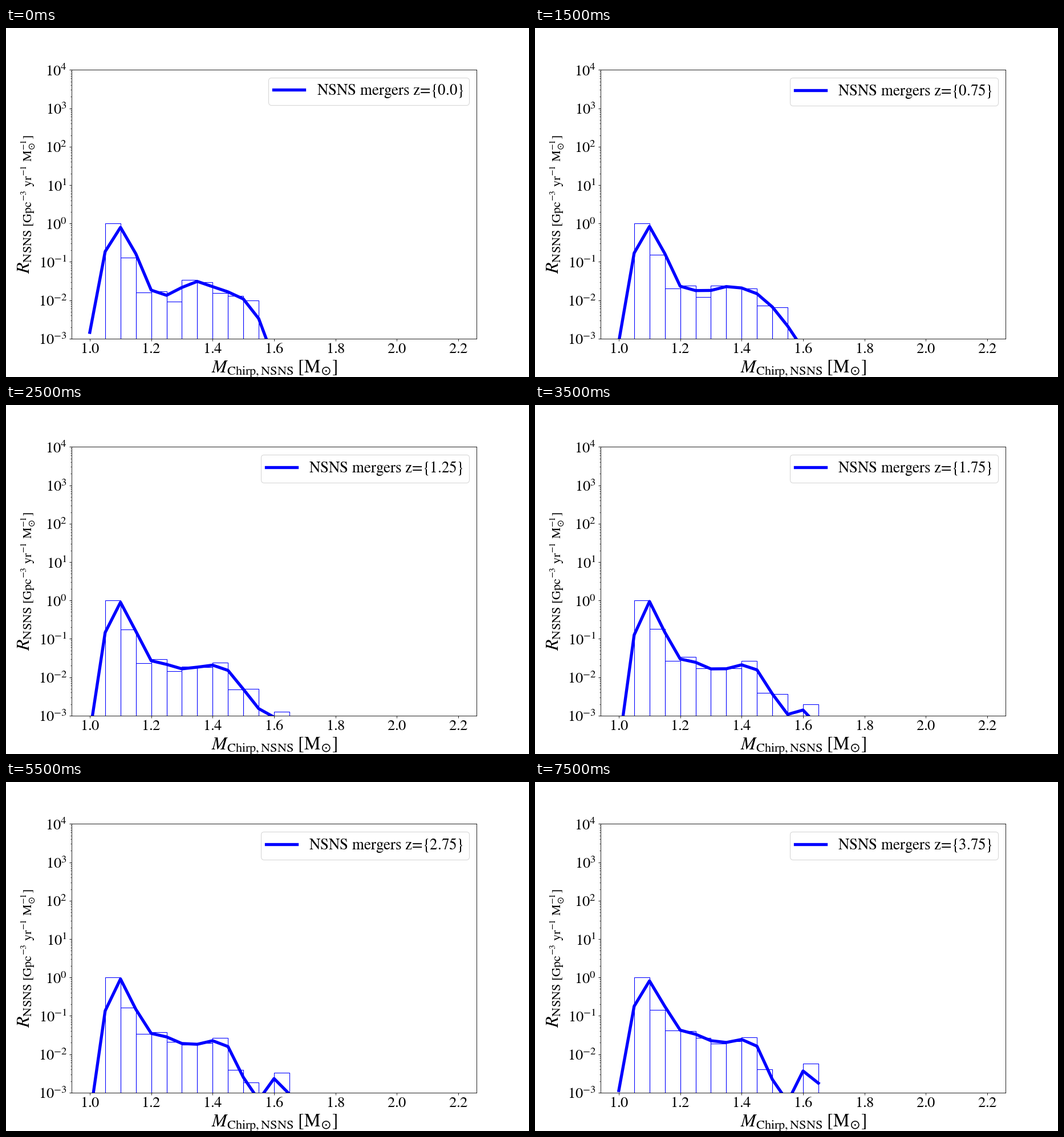
Animation, 917 px wide and 611 px high, one loop 8 s. Source, as a matplotlib script:

```python
import numpy as np
import matplotlib.pyplot as plt
from matplotlib.animation import FuncAnimation
from matplotlib.ticker import FuncFormatter, LogLocator, NullFormatter

W, H = 917, 611
DPI = W / 12
FRAMES, INTERVAL = 16, 500
TICK_SIZE, LABEL_SIZE = 25, 30
BIN = 0.05
FLOOR = 1e-6
SUN = r"_{\mathdefault{⊙}}"

plt.rcParams.update({
    "font.family": "Liberation Serif",
    "mathtext.fontset": "stix",
    "font.size": TICK_SIZE,
})

bins = 1.05 + BIN * np.arange(12)
grid = 1.0 + BIN * np.arange(14)

# Log10 of the histogram at its start, its turning point and its end.
KEY_STEPS = [0, 6, 15]
KEY_BARS = np.array([
    [0, -.89, -1.8, -1.77, -2.03, -1.47, -1.53, -1.82, -1.88, -2.0, -4, -3.5],
    [0, -.73, -1.6, -1.48, -1.8, -1.77, -1.78, -1.58, -2.41, -2.37, -4, -2.77],
    [0, -.84, -1.38, -1.39, -1.58, -1.73, -1.66, -1.56, -2.4, -3.03, -4, -2.25],
])

# Typical mass within each bin: high in the first, low in the tail.
masses = bins + np.select([bins < 1.08, bins > 1.43], [0.045, 0.015], BIN / 2)


def histogram(step):
    return 10 ** np.array([np.interp(step, KEY_STEPS, k) for k in KEY_BARS.T])


def density(step):
    """Gaussian kernel estimate of the histogram, with a breathing bandwidth."""
    width = 0.0247 + 0.0022 * np.cos(2 * np.pi * step / 17)
    gap = (grid[:, None] - masses) / width
    kernel = np.exp(-gap**2 / 2) / (width * np.sqrt(2 * np.pi))
    return kernel @ histogram(step) * BIN


def label(step):
    return r"$\text{NSNS mergers z=\{%s\}}$" % (step / 4)


# The small surplus keeps the pixel size from rounding down.
fig = plt.figure(figsize=((W + 0.01) / DPI, (H + 0.01) / DPI), dpi=DPI,
                 facecolor="white")
ax = fig.add_axes([0.125, 0.11, 0.775, 0.77])
ax.set_yscale("log")

bars = ax.bar(bins, histogram(0) - FLOOR, BIN, bottom=FLOOR, align="edge",
              fill=False, edgecolor="blue", linewidth=1)
line, = ax.plot(grid, density(0), color="blue", lw=5, label=label(0))

ax.set_xlim(0.94, 2.26)
ax.set_ylim(1e-3, 1e4)
ax.set_xticks(np.arange(1.0, 2.3, 0.2))
ax.set_yticks(10.0 ** np.arange(-3, 5))
ax.yaxis.set_minor_locator(LogLocator(subs=range(2, 10), numticks=99))
ax.yaxis.set_minor_formatter(NullFormatter())
ax.xaxis.set_major_formatter(FuncFormatter(lambda x, _: r"$\mathrm{%.1f}$" % x))
ax.yaxis.set_major_formatter(
    FuncFormatter(lambda y, _: r"$\mathrm{10^{%d}}$" % round(np.log10(y))))
ax.tick_params(labelsize=TICK_SIZE)
ax.tick_params(axis="x", pad=4.5)


def axis_label(x, y, text, rotation=0):
    # DejaVu Sans only supplies the sun sign; the rest is set in STIX.
    fig.text(x / W, 1 - y / H, text, size=LABEL_SIZE, family="DejaVu Sans",
             ha="center", va="baseline", rotation=rotation,
             rotation_mode="anchor")


axis_label(470.5, 603.7, r"$M_{\rm Chirp,NSNS}\;\rm [M%s]$" % SUN)
axis_label(41.3, 308.6,
           r"$R_{\rm NSNS\ [Gpc^{-3}\ yr^{-1}\ M%s^{-1}]}$" % SUN, rotation=90)

legend = ax.legend(loc="upper right", fontsize=25.3, borderpad=0.35)


def update(step):
    for bar, rate in zip(bars, histogram(step)):
        bar.set_height(rate - FLOOR)
    line.set_ydata(density(step))
    legend.get_texts()[0].set_text(label(step))
    return [*bars, line, legend]


anim = FuncAnimation(fig, update, frames=FRAMES, interval=INTERVAL,
                     repeat=True, repeat_delay=0, blit=False)
plt.show()
```
